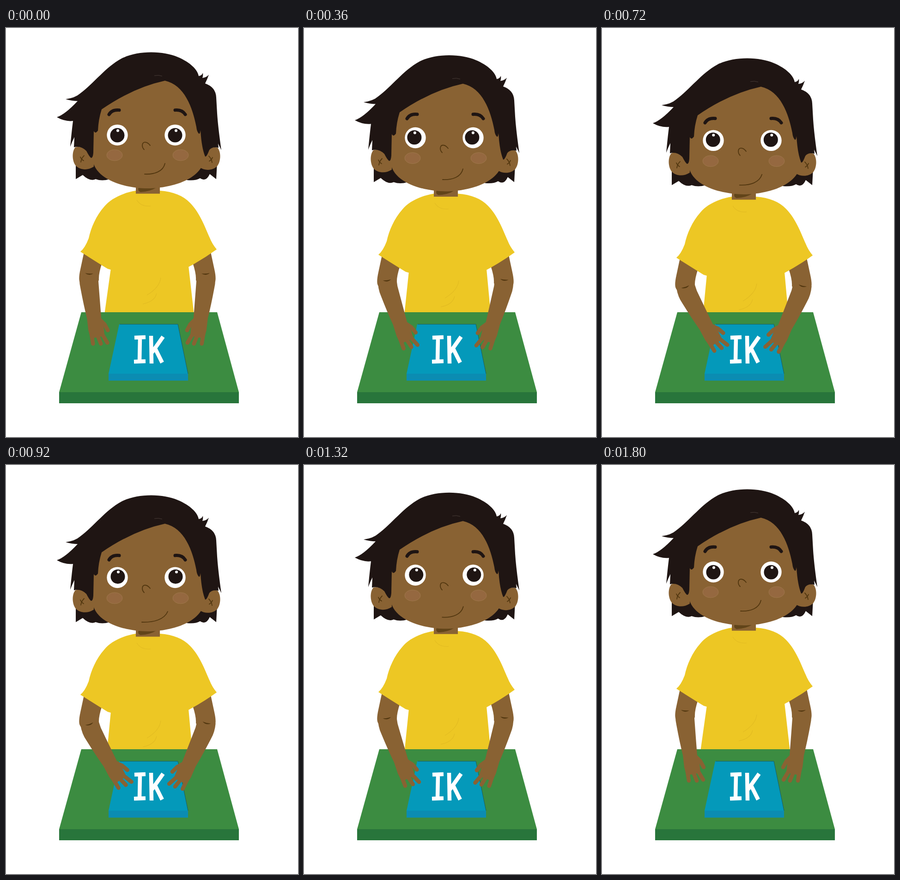
An HTML page for the animation above (1840 ms loop, 632 px wide and 885 px high).

```html
<!DOCTYPE html>
<html lang="nl">
<head>
<meta charset="utf-8">
<title>IK</title>
<style>
  html, body { margin: 0; width: 100%; height: 100%; overflow: hidden; background: #fff; }
  svg { display: block; width: 100%; height: 100%; }
  .skin { fill: #896233; }
  .hair { fill: #1f1513; }
  .shirt { fill: #edc724; }
  .line { fill: none; stroke: #51360f; stroke-width: 1.8; stroke-linecap: round; }
  .fold { fill: none; stroke: #e3bc22; stroke-width: 1.2; }
  .finger { fill: none; stroke: #896233; stroke-width: 8.5; stroke-linecap: round; stroke-linejoin: round; }
  .brow { fill: none; stroke: #1f1513; stroke-width: 7; stroke-linecap: round; }
  .letters { fill: none; stroke: #fff; stroke-width: 8.5; stroke-linejoin: round; }
</style>
</head>
<body>
<svg viewBox="0 0 632 885">
  <defs>
    <path id="upper" class="skin" d="M170 480L161 522Q157 540 159 548Q163 560 178 560Q198 556 201 545Q200 532 208 508Z"/>
    <g id="fore">
      <path class="skin" d="M161 527Q157 545 161 562Q168 600 175 628L178 654L183 672L196 669L213 666L211 646L206 628Q203 590 200 548L201 528Q180 518 161 527Z"/>
      <path class="finger" d="M204 632L213 641L220 654M204 656L219 681M195 658L205 683M183 652L188 683"/>
      <path fill="#51360f" d="M171 530Q180 532 189 531Q180 537 171 530Z"/>
    </g>
    <g id="ear">
      <path class="skin" d="M150 258C164 253 180 265 190 281V300C176 309 160 307 151 298C143 288 142 268 150 258Z"/>
      <path class="line" stroke-width="1.5" d="M169 276Q163 282 162 290M161 279Q163 284 168 287"/>
    </g>
  </defs>

  <path id="trunk" class="shirt"/>
  <path fill="#3c8c41" d="M163 615H457L504 788H115Z"/>
  <path fill="#28753b" d="M115 788H504V812H115Z"/>
  <path fill="#0499ba" d="M245 641H372L394 748H222Z"/>
  <path fill="#0b8cb2" d="M222 748H394V763H222Z"/>
  <path fill="none" stroke="#1c5d5f" d="M246 641H372L394 748"/>
  <g class="letters" role="img" aria-label="IK">
    <path d="M278 670L302 669M290 670L289 722M277 722L302 721"/>
    <path d="M314 666L315 726M340 668L316 702M322 692L338 724"/>
  </g>

  <g id="body">
    <use href="#upper"/>
    <use href="#upper" transform="translate(612 0) scale(-1 1)"/>
    <use href="#fore" id="left"/>
    <g transform="translate(612 0) scale(-1 1)"><use href="#fore" id="right"/></g>
    <path class="shirt" d="M281 352C250 357 225 371 213 386C195 406 184 432 179 455Q171 476 161 484Q192 504 220 521L227 523H394L395 517Q427 500 456 479Q446 467 441 454C431 432 420 400 398 378C384 363 362 354 333 352Z"/>
    <path class="fold" d="M283 372Q292 387 313 385M335 540Q333 561 305 578M326 574Q322 592 296 597"/>
    <path class="skin" d="M281 335H333V358.500H281Z"/>
    <path fill="#614419" d="M287 345H326Q312 354 291 355Q284 352 287 345Z"/>

    <path class="hair" d="M151 290L151 327L166 318Q182 333 194 327Q208 332 224 327L200 280Z"/>
    <path class="hair" d="M457 290L455 327L441 316Q433 334 420 325Q410 331 391 329L410 280Z"/>
    <use href="#ear"/>
    <use href="#ear" transform="translate(608 1) scale(-1 1)"/>
    <path class="skin" d="M187 281C190 330 262 347 307 347C352 347 425 330 430 280L424 200L405 130L344 108L205 150L188 200Z"/>
    <path class="hair" d="M147 258L148 236Q143 246 139 257Q142 225 145 201Q128 203 110 193Q128 187 155 158Q143 158 129 154Q150 151 160 142C190 120 215 85 250 66C285 48 340 49 372 63C398 74 415 90 417 104Q424 103 426 97Q427 103 425 108Q434 107 439 101Q436 110 431 120Q454 128 455 150L457 185Q459 215 466 264L459 250L460 259Q446 256 440 264Q434 280 431 278Q423 258 421 221Q420 229 418 229Q413 225 412 214C404 172 386 123 344 114Q275 129 207 176Q200 198 199 222Q193 230 190 223L189 270Q188 282 184 281Q180 278 174 266Q162 254 147 258Z"/>
    <path fill="none" stroke="#594c47" stroke-width=".7" d="M321 103Q330 101 338 104"/>
    <g fill="#956840" stroke="#a37b4e" stroke-width=".8">
      <ellipse cx="235" cy="275" rx="17" ry="12"/>
      <ellipse cx="378" cy="275" rx="17" ry="12"/>
    </g>
    <path class="line" d="M299 263C293 257 294 247 301 247C306 247 309 250 312 254"/>
    <path id="mouth" class="line"/>
    <path id="brows" class="brow" d="M223 187Q229 176 245 177.500M366 177.500Q381 176 388 187"/>
    <g id="eyes">
      <circle cx="241" cy="231.500" r="22.700" fill="#fff"/>
      <circle cx="366" cy="231.500" r="22.700" fill="#fff"/>
      <g id="pupils">
        <circle class="hair" cx="241" cy="232" r="15.500"/>
        <circle class="hair" cx="366" cy="232" r="15.500"/>
        <circle cx="242" cy="222" r="3" fill="#fff"/>
        <circle cx="368" cy="222" r="3" fill="#fff"/>
      </g>
    </g>
  </g>
</svg>
<script>
  const LOOP = 1840, STEP = 40;
  const el = id => document.getElementById(id);
  const set = (id, name, value) => el(id).setAttribute(name, value);

  const smooth = (t, from, to) => {
    const p = Math.min(1, Math.max(0, (t - from) / (to - from)));
    return p * p * (3 - 2 * p);
  };

  // Eased value through [time, value] keys.
  const track = (t, keys) => {
    let value = keys[0][1];
    for (let i = 1; i < keys.length; i++) {
      value += (keys[i][1] - keys[i - 1][1]) * smooth(t, keys[i - 1][0], keys[i][0]);
    }
    return value;
  };

  const gazeX = [[0, 0], [360, -2.1], [560, -2.1], [900, 1], [1200, 1.2], [1480, 2.7], [1760, 0]];
  const gazeY = [[0, 0], [640, -2], [920, -2.5], [1040, -2.5], [1640, 0]];

  function draw(t) {
    const lean = smooth(t, -40, 760) - smooth(t, 1040, 1650);
    const grin = smooth(t, 580, 920) - smooth(t, 1040, 1400);
    const hem = 1 - (1 - lean) ** 2;
    const drop = 13 * lean;

    set('body', 'transform', `translate(0 ${drop})`);
    set('left', 'transform', `rotate(${-21.5 * lean} 223 538)`);
    set('right', 'transform', `rotate(${-17 * lean} 225 545.5)`);
    set('trunk', 'd', `M227 ${520 + drop}L${213.5 + 5.5 * hem} 616H${406.5 - 3.5 * hem}L395 ${515 + drop}Z`);
    set('brows', 'transform', `translate(0 ${5.3 * lean})`);
    set('eyes', 'transform', `translate(0 ${-lean})`);
    set('pupils', 'transform', `translate(${track(t, gazeX)} ${track(t, gazeY)})`);

    const y = 11 * lean, w = 6 * grin;
    set('mouth', 'd', `M${300 - w} ${316 + y}C${322 - w / 3} ${317 + y} ${340 + w / 2} ${310 + y} ${344 + w} ${293 + y}`);
  }

  const start = performance.now();
  function tick() {
    const t = (performance.now() - start) % LOOP;
    draw(Math.floor(t / STEP) * STEP);
    requestAnimationFrame(tick);
  }
  draw(0);
  requestAnimationFrame(tick);
</script>
</body>
</html>
```
